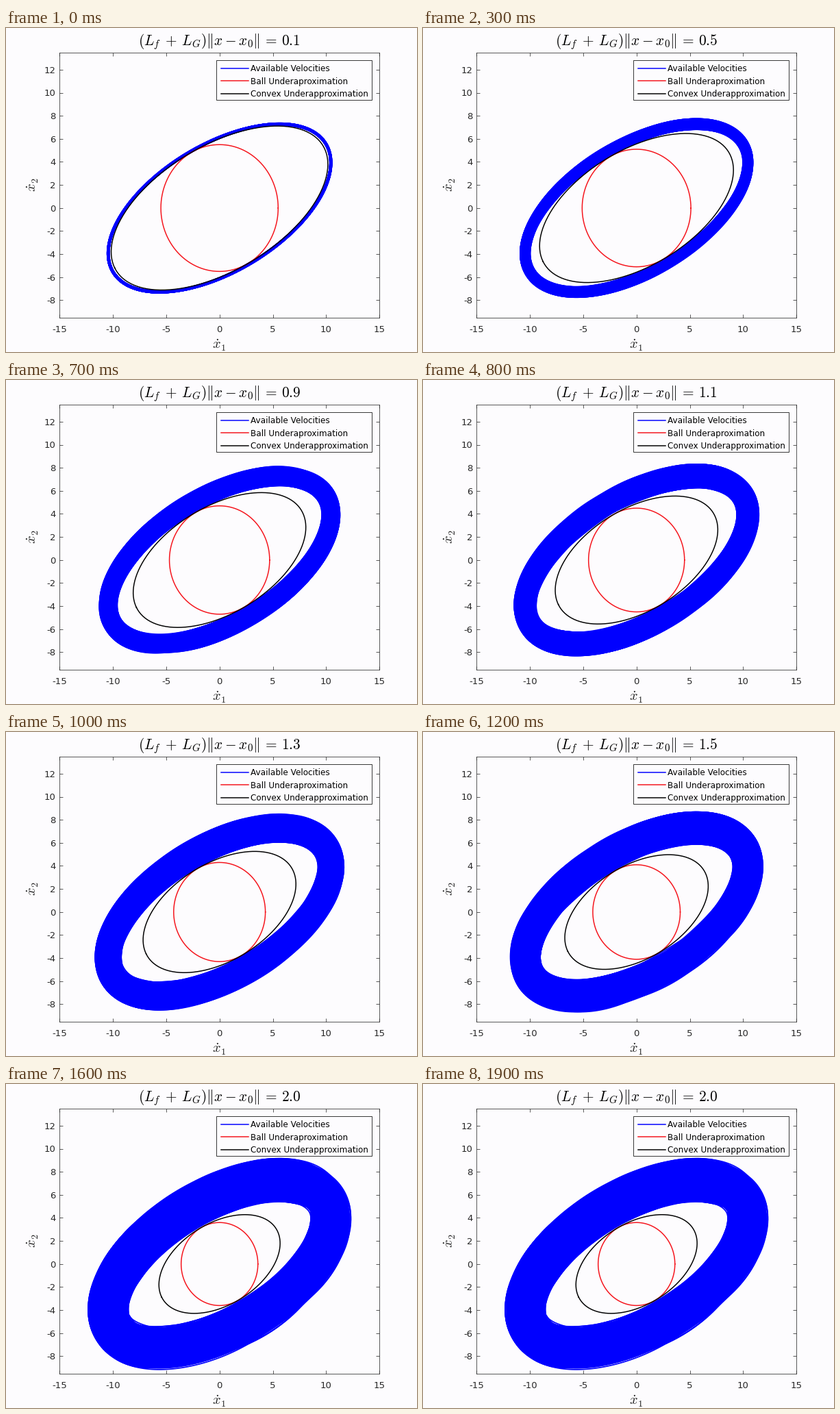
These frames come from a looping animation (600 by 473 pixels, 2 s). A matplotlib script:

```python
import numpy as np
import matplotlib.pyplot as plt
from matplotlib.animation import FuncAnimation
from matplotlib.collections import LineCollection
from matplotlib.lines import Line2D
from matplotlib.patches import Rectangle

W, H, DPI = 600, 473, 100
PX = 72 / DPI
PAPER, INK = "#fdfcfe", "#262626"
BLUE, RED, BLACK = "#0000ff", "#f5141c", "#000000"

plt.rcParams["font.family"] = "DejaVu Sans"
plt.rcParams["mathtext.fontset"] = "cm"

# Velocity map: the reachable set is the image of the unit disc under G.
G = np.array([[10.0, 3.0], [2.0, 7.0]])
AXES, (MAJOR, MINOR), _ = np.linalg.svd(G)

fig = plt.figure(figsize=(W / DPI, H / DPI), dpi=DPI, facecolor=PAPER)


def label(x, y, text, size, ha="center", **kw):
    return fig.text(x / W, 1 - y / H, text, fontsize=size, ha=ha, **kw)


def ellipse(a, b, t):
    return AXES @ np.array([a * np.cos(t), b * np.sin(t)])


def normal(t):
    n = AXES @ np.array([MINOR * np.cos(t), MAJOR * np.sin(t)])
    return n / np.hypot(*n)


def offset(t, d):
    return ellipse(MAJOR, MINOR, t) + d * normal(t)


# Axes box with ticks on all four sides
left, right, top, bottom = 78.2, 545.2, 35.6, 422.7
ax = fig.add_axes([left / W, 1 - bottom / H, (right - left) / W, (bottom - top) / H],
                  facecolor=PAPER)
ax.set(xlim=(-15, 15), ylim=(-9.5, 13.5),
       xticks=range(-15, 16, 5), yticks=range(-8, 13, 2))
ax.tick_params(direction="in", top=True, right=True, length=4.7 * PX,
               width=0.75 * PX, color=INK, labelbottom=False, labelleft=False)
for spine in ax.spines.values():
    spine.set(linewidth=0.75 * PX, color=INK)

for v in range(-15, 16, 5):
    label(left + (v + 15) * (right - left) / 30, 443.7, str(v), 9.5, color=INK)
for v in range(-8, 13, 2):
    y = top + (13.5 - v) * (bottom - top) / 23
    label(72.5, y + 4.8, str(v), 9.5, "right", color=INK)

label(311.7, 468.3, r"$\dot{x}_1$", 14.6, color=INK)
label(39.6, 228.7, r"$\dot{x}_2$", 14.6, va="center", rotation=90, color=INK)
title = label(311.5, 25.5, "", 15.4)

# Legend
fig.add_artist(Rectangle((307.2 / W, 1 - 105.4 / H), 227 / W, 58.5 / H, fc=PAPER,
                         ec=INK, lw=0.9 * PX, transform=fig.transFigure))
entries = [("Available Velocities", BLUE), ("Ball Underaproximation", RED),
           ("Convex Underapproximation", BLACK)]
for i, (text, color) in enumerate(entries):
    y = 58.8 + 18.6 * i
    fig.add_artist(Line2D([314 / W, 354 / W], [1 - y / H] * 2, color=color,
                          lw=1.5 * PX))
    label(357, y + 4.4, text, 8.65, "left")

# Curves
turn = np.linspace(0, 2 * np.pi, 241)
band, = ax.fill([0], [0], color=BLUE, lw=0, zorder=2)
strands = LineCollection([], colors=BLUE, linewidths=1.7 * PX, zorder=3)
ax.add_collection(strands, autolim=False)
ball, = ax.plot([], [], color=RED, lw=1.5 * PX, zorder=4)
convex, = ax.plot([], [], color=BLACK, lw=1.5 * PX, zorder=5)


def draw(k):
    step = min(int(1.2 * k + 0.5) + 1, 20)
    d = step / 10
    title.set_text(rf"$(L_f\:+\:L_G)\|x - x_0\|\,=\,{d:.1f}$")

    ring = np.hstack([offset(turn, 0.9 * d), offset(turn[::-1], -0.9 * d)])
    band.set_xy(ring.T)

    # Smoothly perturbed boundaries sway across the band
    rng = np.random.default_rng(step)
    lines = []
    for phase, shift in rng.uniform(0, 2 * np.pi, (40, 2)):
        sway = 0.94 * d * np.cos(phase + 1.5 * np.sin(turn + shift))
        lines.append(offset(turn, sway).T)
    strands.set_segments(lines)

    b = MINOR - d
    a = 1 / (1 / MAJOR + 0.76 * (1 / b - 1 / MINOR))
    ball.set_data(b * np.cos(turn), b * np.sin(turn))
    convex.set_data(*ellipse(a, b, turn))
    return title, band, strands, ball, convex


anim = FuncAnimation(fig, draw, frames=20, interval=100, repeat=True,
                     repeat_delay=0, init_func=lambda: draw(0), blit=False)
plt.show()
```
